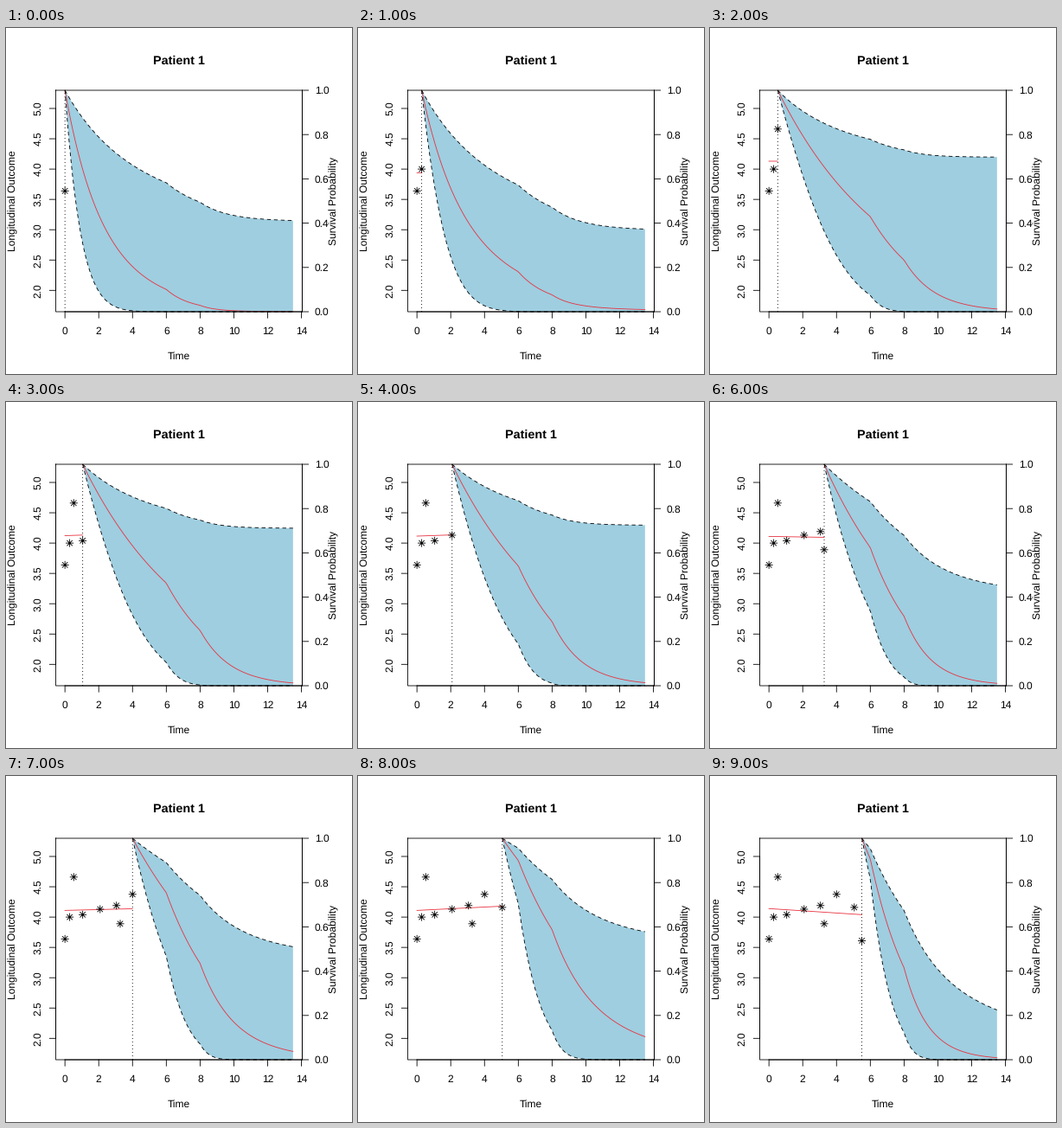
Recreate the animation shown at these times as a matplotlib script. Size 400 by 400 pixels, loop 10 s.

```python
import numpy as np
import matplotlib.pyplot as plt
from matplotlib.animation import FuncAnimation

PX = 0.72  # points per pixel at 100 dpi
LW = 0.85  # line width in pixels
plt.rcParams.update({"font.family": "Liberation Sans", "text.hinting": "none",
                     "path.snap": False})

LEFT, RIGHT, TOP, BOTTOM = 57.6, 342.4, 72, 328
BLUE, RED = "#9ecee0", "#e8323f"
T_END = 13.5

# visit time, measured outcome
VISITS = np.array([(0, 3.64), (0.28, 4.0), (0.52, 4.66), (1.05, 4.04),
                   (2.08, 4.13), (3.05, 4.19), (3.27, 3.89), (4.0, 4.375),
                   (5.05, 4.16), (5.5, 3.61)])

# model settings at the key visits, linear between them
KEYS = [0, 1, 2, 4, 6, 8, 9]
MEDIAN = ([0.43, 0.36, 0.155, 0.157, 0.173, 0.112, 0.196],
          [0.04, 0.067, 0.002, 0.001, 0.001, 0.017, 0.001])
UPPER = ([0.138, 0.143, 0.078, 0.067, 0.076, 0.05, 0.096],
         [0.154, 0.143, 0.217, 0.208, 0.087, 0.078, 0.04])
LOWER = ([1.05, 0.7, 0.29, 0.33, 0.35, 0.36, 0.4],
         [-0.125, -0.167, -0.167, -0.125, -0.09, -0.05, -0.067])
FIT = ([3.94, 3.94, 4.13, 4.115, 4.11, 4.11, 4.14],
       [0, 0, 0, 0.02, -0.015, 0.07, -0.1])


def tx(t):
    return 68.15 + 19.53 * np.asarray(t)


def oy(v):
    return 93 + 70.1 * (5 - np.asarray(v))


def sy(p):
    return BOTTOM - (BOTTOM - TOP) * np.asarray(p)


def settings(rows, i):
    return [np.interp(i, KEYS, row) for row in rows]


def baseline(t):
    """Cumulative hazard whose rate steps up at times 6 and 8."""
    return t + np.maximum(t - 6, 0) + 1.6 * np.maximum(t - 8, 0)


def survival(rows, i, t):
    """Survival given alive at t[0]; the hazard fades or grows with bend."""
    rate, bend = settings(rows, i)
    risk = baseline(t) - baseline(t[0])
    return np.exp(rate * np.expm1(-bend * risk) / bend)


def stars(x, y):
    """Eight-spoked stars as one path with gaps."""
    xs, ys = [], []
    for angle in np.arange(4) * np.pi / 4:
        r = 4.1 if np.sin(2 * angle) ** 2 < 0.5 else 4.1
        dx, dy = r * np.cos(angle), r * np.sin(angle)
        xs.append([x - dx, x + dx, x * np.nan])
        ys.append([y - dy, y + dy, y * np.nan])
    return [np.swapaxes(a, 1, 2).ravel() for a in (np.array(xs), np.array(ys))]


fig = plt.figure(figsize=(4, 4), dpi=100, facecolor="white")
ax = fig.add_axes([0, 0, 1, 1])
ax.set(xlim=(0, 400), ylim=(400, 0))
ax.axis("off")


def line(x=(), y=(), color="black", z=3, dash=None):
    style = (0, tuple(d / LW for d in dash)) if dash else "-"
    return ax.plot(x, y, color=color, lw=LW * PX, zorder=z, linestyle=style)[0]


def label(x, y, s, size=12, ha="center", rot=0, **kw):
    ax.text(x, y, s, fontsize=size * PX, ha=ha, va="baseline", rotation=rot,
            rotation_mode="anchor", zorder=6, **kw)


line([LEFT, RIGHT, RIGHT, LEFT, LEFT], [TOP, TOP, BOTTOM, BOTTOM, TOP], z=4)
line(tx([0, 14]), [BOTTOM] * 2, z=4)
line([LEFT] * 2, oy([2, 5]), z=4)
line([RIGHT] * 2, [TOP, BOTTOM], z=4)
for t in range(0, 15, 2):
    line([tx(t)] * 2, [BOTTOM, BOTTOM + 7.2])
    label(tx(t), 354, str(t))
for v in np.arange(2, 5.1, 0.5):
    line([LEFT - 7.2, LEFT], [oy(v)] * 2)
    label(40.3, oy(v), f"{v:.1f}", rot=90)
for p in np.arange(0, 1.1, 0.2):
    line([RIGHT, RIGHT + 7.2], [sy(p)] * 2)
    label(356.8, sy(p) + 4.3, f"{p:.1f}", ha="left")

label(200, 42, "Patient 1", size=14.4, weight="bold")
label(200, 383, "Time")
label(11.5, 200, "Longitudinal Outcome", rot=90)
label(383, 200, "Survival Probability", rot=90)

band = plt.Polygon([(0, 0)] * 3, fc=BLUE, ec="none", zorder=1)
ax.add_patch(band)
now = line(dash=(1, 3))
fit = line(color=RED)
median = line(color=RED)
upper, lower = (line(dash=(4.4, 3.6)) for _ in range(2))
marks = line(z=5)


def draw(i):
    start = VISITS[i, 0]
    t = np.linspace(start, T_END, 120)
    x = tx(t)
    mid, up, low = (sy(survival(rows, i, t)) for rows in (MEDIAN, UPPER, LOWER))
    band.set_xy(np.c_[np.r_[x, x[::-1]], np.r_[up, low[::-1]]])
    for curve, y in ((median, mid), (upper, up), (lower, low)):
        curve.set_data(x, y)
    now.set_data([tx(start)] * 2, [BOTTOM, TOP])
    level, rise = settings(FIT, i)
    fit.set_data(tx([0, start]), oy([level, level + rise]))
    fit.set_visible(i > 0)
    seen = VISITS[:i + 1]
    marks.set_data(*stars(tx(seen[:, 0]), oy(seen[:, 1])))
    return [band, now, fit, median, upper, lower, marks]


anim = FuncAnimation(fig, draw, frames=len(VISITS), interval=1000,
                     repeat=True, repeat_delay=0, blit=False)
plt.show()
```
